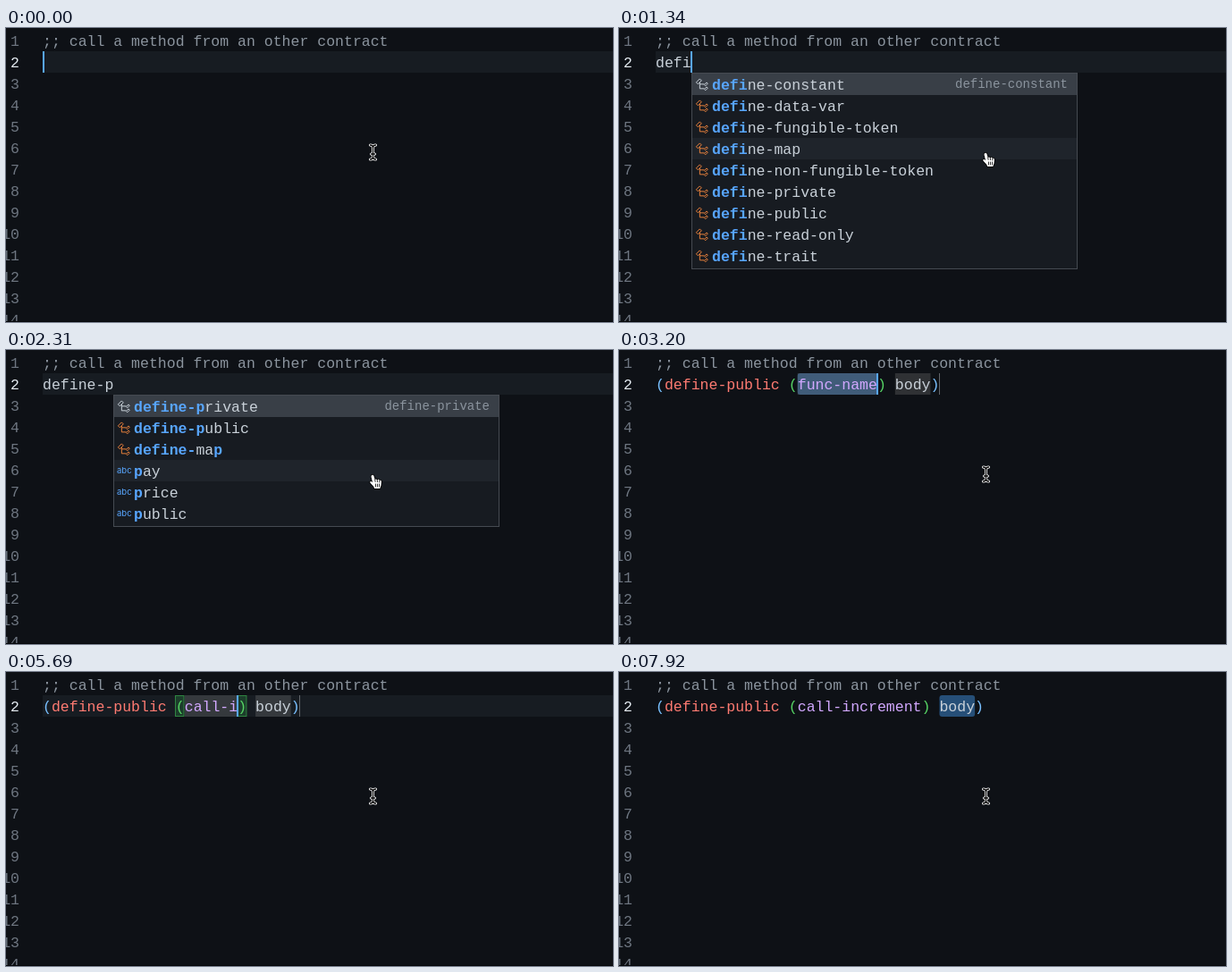
An HTML page with a canvas that plays this animation: 679x329 px, repeating every 8 s.

```html
<!DOCTYPE html>
<html lang="en">
<head>
<meta charset="utf-8">
<title>Editor typing</title>
<style>
html, body { margin: 0; width: 100%; height: 100%; overflow: hidden; background: #0e1116; }
canvas { display: block; }
</style>
</head>
<body>
<canvas id="stage" width="679" height="329"></canvas>
<script>
const ctx = document.getElementById('stage').getContext('2d');
const LOOP = 8000, CELL = 9.92, LEFT = 41, ROW = 24, BASE = 20;
const MONO = '"Liberation Mono", "Courier New", monospace';
const C = {
  bg: '#0e1116', line: '#171c22', text: '#c9d1d9', comment: '#8b949e',
  number: '#6e7681', active: '#e6edf3', blue: '#58a6ff', keyword: '#ff7b72',
  func: '#d2a8ff', outer: '#79c0ff', inner: '#56d364', select: '#264f78',
  slot: 'rgba(124,124,124,0.3)', marker: '#62666b', panel: '#171b21',
  border: '#454a51', picked: '#393f47', hover: '#1f242b', icon: '#e8813c'
};

// Times of each keystroke
const WORD = 'define-p', WORD_KEYS = [980, 1070, 1250, 1340, 1430, 1510, 1690, 1870];
const NAME = 'call-increment';
const NAME_KEYS = [4100, 4360, 4450, 4540, 5340, 5690, 5780, 5870, 6050, 6140, 6230, 6410, 6500, 6580];
const POPUP = 1070, MOVE = 2850, ACCEPT = 3200, MATCH = 4190, TAB = 7200, LEAVE = 7920;
const CARET_OFF = [[440, 980], [2310, 2850], [3650, 4100], [5070, 5340], [7120, 7200], [7650, LOOP]];

const DEFINES = ['constant', 'data-var', 'fungible-token', 'map', 'non-fungible-token',
  'private', 'public', 'read-only', 'trait'].map(s => 'define-' + s);
const FILTERED = ['define-private', 'define-public', 'define-map', 'pay', 'price', 'public'];

const colX = col => LEFT + col * CELL;
const typed = (word, keys, t) => word.slice(0, keys.filter(k => t >= k).length);

function rect(x, y, w, h, color) {
  ctx.fillStyle = color;
  ctx.fillRect(x, y, w, h);
}

function round(x, y, w, h, color) {
  ctx.fillStyle = color;
  ctx.beginPath();
  ctx.roundRect(x, y, w, h, 3);
  ctx.fill();
}

function text(str, x, y, color, bold = false, size = 16.53) {
  ctx.font = (bold ? 'bold ' : '') + size + 'px ' + MONO;
  ctx.fillStyle = color;
  ctx.fillText(str, x, y);
}

function caret(col) {
  rect(Math.max(LEFT, Math.floor(40.4 + col * CELL)), 26, 2, ROW, C.blue);
}

function gutter() {
  for (let n = 1; n <= 14; n++) {
    const s = String(n);
    text(s, 15 - s.length * CELL, BASE + (n - 1) * ROW, n === 2 ? C.active : C.number);
  }
}

const TREE = new Path2D(`M1.4 5.35 L5.35 1.4 L7.3 3.35 L3.35 7.3 Z
  M5.35 5.4 V12.35 H10.4 M5.35 7.35 H10.4
  M10.4 8 L13 5.4 L14.3 6.7 L11.7 9.3 Z M10.4 13 L13 10.4 L14.3 11.7 L11.7 14.3 Z`);

function classIcon(x, y, color) {
  ctx.save();
  ctx.translate(x, y);
  ctx.strokeStyle = color;
  ctx.lineWidth = 1;
  ctx.stroke(TREE);
  ctx.restore();
}

function wordIcon(x, y) {
  ctx.font = '9.5px Inter, "Open Sans", sans-serif';
  ctx.fillStyle = C.blue;
  ctx.fillText('abc', x, y);
}

// Bold the characters that match the query in order
function label(item, query, x, y) {
  const q = item.startsWith('define') ? query : query.slice(-1);
  let hit = 0;
  [...item].forEach((ch, i) => {
    const match = hit < q.length && ch === q[hit];
    if (match) hit++;
    text(ch, x + i * CELL, y, match ? C.blue : C.text, match);
  });
}

function suggestions(query) {
  if (query === WORD) return FILTERED;
  if (query.length > 3) return DEFINES;
  const list = ['default-to', ...DEFINES];
  return query.length > 2 ? list : [...list, 'index-of', 'decimals'];
}

function popup(query, picked) {
  const items = suggestions(query), x = Math.round(colX(query.length)), w = 432;
  rect(x, 50, w, items.length * ROW + 4, C.border);
  rect(x + 1, 51, w - 2, items.length * ROW + 2, C.panel);
  items.forEach((item, i) => {
    const y = 51 + i * ROW, on = i === picked;
    if (on || i === 3) rect(x + 1, y, w - 2, ROW, on ? C.picked : C.hover);
    if (query === WORD && i > 2) wordIcon(x + 4, y + 15);
    else classIcon(x + 4, y + 4.5, on ? C.text : C.icon);
    label(item, query, x + 23, y + 18);
    if (on) text(item, x + w - 11 - item.length * 8.4, y + 16, C.comment, false, 14);
  });
}

function bracketBox(col) {
  const x = Math.floor(colX(col)) + 0.5;
  rect(x, 26.5, CELL - 0.5, 23, 'rgba(46,160,67,0.25)');
  ctx.strokeStyle = '#2f8541';
  ctx.lineWidth = 1;
  ctx.strokeRect(x, 26.5, CELL - 0.5, 23);
}

function snippet(t, caretOn) {
  const name = typed(NAME, NAME_KEYS, t) || 'func-name';
  const start = 16, close = start + name.length, body = close + 2, end = body + 5;
  const naming = t < NAME_KEYS[0], inBody = t >= TAB, live = t < LEAVE;
  const span = (col, n, color) => round(colX(col), 26, n * CELL, ROW, color);

  if (naming) span(start, name.length, C.select);
  if (inBody) span(body, 4, C.select);
  if (live) {
    rect(colX(start), 26, name.length * CELL, ROW, C.slot);
    rect(colX(body), 26, 4 * CELL, ROW, C.slot);
    rect(Math.floor(colX(end)), 26, 1, ROW, C.marker);
  }
  if (t >= MATCH && !inBody) {
    bracketBox(start - 1);
    bracketBox(close);
  }
  [['(', 0, C.outer], ['define-public', 1, C.keyword], ['(', 15, C.inner],
   [name, start, C.func], [')', close, C.inner], ['body', body, C.text],
   [')', end - 1, C.outer]].forEach(([s, col, color]) => text(s, colX(col), BASE + ROW, color));
  if (caretOn) caret(inBody ? end - 1 : close);
}

const BEAM = new Path2D(`M407.5 131 Q410.5 131 410.5 134 V144 Q410.5 147 407.5 147
  M413.5 131 Q410.5 131 410.5 134 M410.5 144 Q410.5 147 413.5 147 M408.5 141 H412.5`);
const HAND = new Path2D(`M2.2 1.5 C3 .3 4.6 .8 5 2 L6.2 6 C7 5 8.4 5.3 8.8 6.4
  C9.8 5.4 11 5.9 11.3 7 C12.4 6.3 13.4 7 13.4 8.4 L13 12.4 L11.8 16 H5.8 L4.5 13.5
  L1 9.8 C.2 8.6 1.2 7.6 2.4 8.2 L3.6 9.2 L2 3 Z`);
const FINGERS = new Path2D('M6.2 6 L6.6 8.4 M8.8 6.4 L9 8.6 M11.3 7 V9 M7 11 V14 M9 11 V14 M11 11 V14');

function pointer(hand) {
  ctx.save();
  ctx.lineJoin = ctx.lineCap = 'round';
  if (hand) {
    ctx.translate(406.5, 139);
    ctx.strokeStyle = '#000';
    ctx.lineWidth = 1.6;
    ctx.stroke(HAND);
    ctx.fillStyle = '#fff';
    ctx.fill(HAND);
    ctx.lineWidth = 0.8;
    ctx.stroke(FINGERS);
  } else {
    [['#fff', 3], ['#000', 1.3]].forEach(([color, w]) => {
      ctx.strokeStyle = color;
      ctx.lineWidth = w;
      ctx.stroke(BEAM);
    });
  }
  ctx.restore();
}

function draw(t) {
  const caretOn = !CARET_OFF.some(([a, b]) => t >= a && t < b);
  const selecting = (t >= ACCEPT && t < NAME_KEYS[0]) || t >= TAB;
  const choosing = t >= POPUP && t < ACCEPT;

  rect(0, 0, 679, 329, C.bg);
  if (!selecting) rect(LEFT, 26, 679 - LEFT, ROW, C.line);
  gutter();
  text(';; call a method from an other contract', LEFT, BASE, C.comment);
  if (t < ACCEPT) {
    const query = typed(WORD, WORD_KEYS, t);
    text(query, LEFT, BASE + ROW, C.text);
    if (caretOn) caret(query.length);
    if (choosing) popup(query, t >= MOVE ? 1 : 0);
  } else {
    snippet(t, caretOn);
  }
  rect(0, 328, 679, 1, '#05070a');
  pointer(choosing);
}

const began = performance.now();
function tick() {
  draw((performance.now() - began) % LOOP);
  requestAnimationFrame(tick);
}
tick();
</script>
</body>
</html>
```
